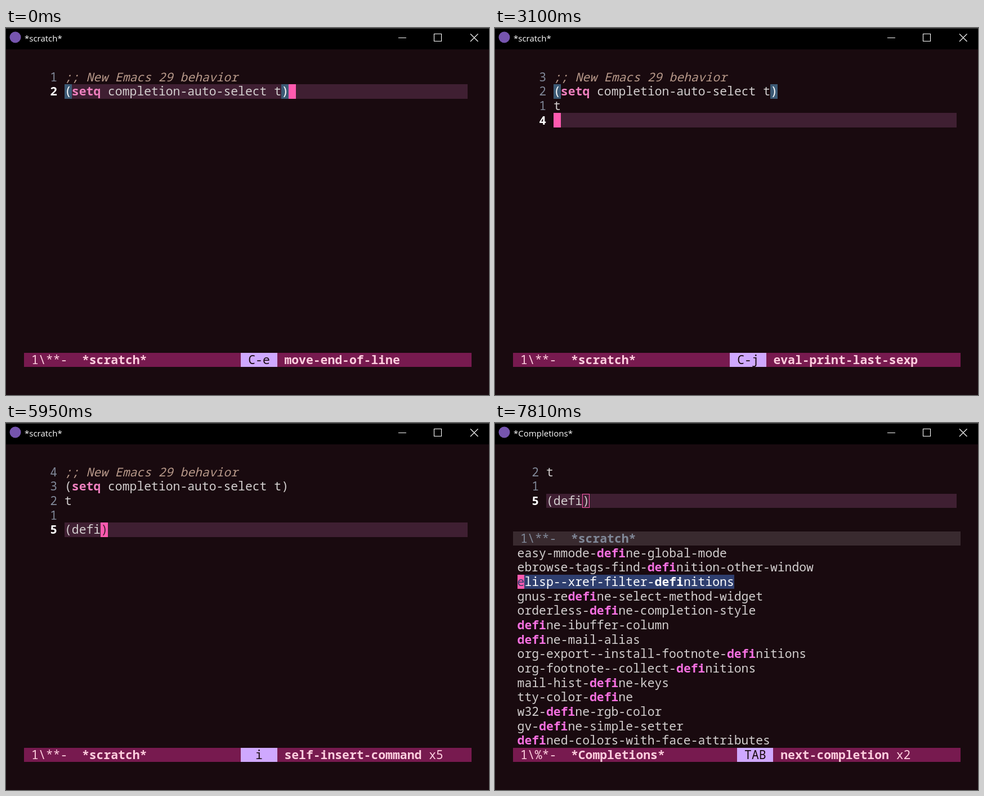
An HTML page with a canvas for the animation above (8 s loop, 858x653 px).

```html
<!DOCTYPE html>
<html lang="en">
<head>
<meta charset="utf-8">
<title>Completion auto-select</title>
<style>
html, body { margin: 0; width: 100%; height: 100%; overflow: hidden; background: #190a0f; }
canvas { display: block; }
</style>
</head>
<body>
<canvas id="stage" width="858" height="653"></canvas>
<script>
const ctx = document.getElementById('stage').getContext('2d');

const LOOP = 8000;
const SIZE = 21.4, CELL = 12.84, ROW = 25.67, BASE = 20.3;
const TOP = 74.4, LIST_TOP = 218.4, MODE_TOP = 577.8;
const LEFT = 32.2, RIGHT = 827, LIST_LEFT = 39.6, HL_RIGHT = 819.5;

const C = {
  bg: '#190a0f', fg: '#d3cfcf', dim: '#808898', white: '#ffffff',
  comment: '#b8998a', keyword: '#ef80bf', match: '#f570e0',
  line: '#3f1f32', cursor: '#ff5aaf', paren: '#3c5a75',
  mode: '#771a4f', modeText: '#ffcfdf', idle: '#392a2f',
  key: '#cfa8ff', select: '#2f3f6f'
};

const CANDIDATES = [
  'easy-mmode-define-global-mode',
  'ebrowse-tags-find-definition-other-window',
  'elisp--xref-filter-definitions',
  'gnus-redefine-select-method-widget',
  'orderless-define-completion-style',
  'define-ibuffer-column',
  'define-mail-alias',
  'org-export--install-footnote-definitions',
  'org-footnote--collect-definitions',
  'mail-hist-define-keys',
  'tty-color-define',
  'w32-define-rgb-color',
  'gv-define-simple-setter',
  'defined-colors-with-face-attributes'
];

const typed = (time, text, count) => ({
  time, lines: 5, text, key: text.slice(-1), command: 'self-insert-command', count
});

// Each key press and the editor state it leads to
const STEPS = [
  { time: 0, lines: 2, key: 'C-e', command: 'move-end-of-line' },
  { time: 3100, lines: 4, key: 'C-j', command: 'eval-print-last-sexp' },
  { time: 4880, lines: 5, text: '', key: 'RET', command: 'newline' },
  typed(5280, '('),
  typed(5560, '(d', 2),
  typed(5680, '(de', 3),
  typed(5800, '(def', 4),
  typed(5950, '(defi', 5),
  { time: 6220, pick: 0, key: 'TAB', command: 'completion-at-point' },
  { time: 7530, pick: 1, key: 'TAB', command: 'next-completion' },
  { time: 7810, pick: 2, key: 'TAB', command: 'next-completion', count: 2 }
];

const HIDDEN = [[280, 840], [1290, 1810], [2370, 2810], [3540, 4070], [4630, 4880], [6720, 7250]];
const PARENS_END = 3250;

function box(x, y, w, h, color) {
  // Snap to whole pixels so edges stay crisp
  const x0 = Math.round(x), y0 = Math.round(y);
  ctx.fillStyle = color;
  ctx.fillRect(x0, y0, Math.round(x + w) - x0, Math.round(y + h) - y0);
}

function write(text, x, top, color, style = '') {
  ctx.font = `${style} ${SIZE}px "Noto Sans Mono", "DejaVu Sans Mono", monospace`;
  ctx.fillStyle = color;
  ctx.fillText(text, x, top + BASE);
}

function titleBar(title) {
  box(0, 0, 858, 38, '#000000');
  box(0, 0, 858, 1, '#4a4a4a');
  ctx.fillStyle = '#7655ae';
  ctx.beginPath();
  ctx.arc(16.5, 16.5, 10, 0, Math.PI * 2);
  ctx.fill();
  ctx.font = '15px "Open Sans", "Noto Sans", sans-serif';
  ctx.fillStyle = '#ffffff';
  ctx.fillText(title, 33, 23.5);

  ctx.strokeStyle = '#ffffff';
  ctx.lineWidth = 1.1;
  ctx.beginPath();
  ctx.moveTo(697, 17.5);
  ctx.lineTo(711, 17.5);
  ctx.rect(760.5, 10.5, 13, 13);
  ctx.moveTo(825, 10.5);
  ctx.lineTo(838.5, 24);
  ctx.moveTo(838.5, 10.5);
  ctx.lineTo(825, 24);
  ctx.stroke();
}

function modeLine(top, flags, name, active) {
  const color = active ? C.modeText : C.dim;
  box(LEFT, top, RIGHT - LEFT, ROW, active ? C.mode : C.idle);
  write(flags, LEFT + CELL, top, color);
  write(name, LEFT + 8 * CELL, top, color, 'bold');
}

function keyHint(col, { key, command, count }) {
  const x = LEFT + col * CELL;
  const textX = x + 6 * CELL;
  box(x, MODE_TOP, 5 * CELL, ROW, C.key);
  write(key, x + (5 - key.length) / 2 * CELL, MODE_TOP, '#190a0f');
  write(command, textX, MODE_TOP, C.modeText, 'bold');
  if (count) write('x' + count, textX + (command.length + 1) * CELL, MODE_TOP, C.modeText);
}

function lineNumber(n, x, top, current) {
  if (current) box(x, top, HL_RIGHT - x, ROW, C.line);
  write(String(n), x - 2 * CELL, top, current ? C.white : C.dim, current ? 'bold' : '');
}

function cursor(x, top, char, ink) {
  box(x, top, CELL, ROW, C.cursor);
  if (char) write(char, x, top, ink);
}

function editor(step, shown, parens) {
  const x = LIST_LEFT + 5 * CELL + 0.2;
  const rowTop = i => TOP + i * ROW;
  const last = step.lines - 1;
  for (let i = 0; i <= last; i++) {
    lineNumber(i === last ? step.lines : last - i, x, rowTop(i), i === last);
  }

  write(';; New Emacs 29 behavior', x, rowTop(0), C.comment, 'italic');
  const code = rowTop(1);
  const parenInk = parens ? C.white : C.fg;
  for (const [char, col] of [['(', 0], [')', 30]]) {
    if (parens) box(x + col * CELL, code, CELL, ROW, C.paren);
    write(char, x + col * CELL, code, parenInk);
  }
  write('setq', x + CELL, code, C.keyword, 'bold');
  write('completion-auto-select t', x + 6 * CELL, code, C.fg);
  if (last > 1) write('t', x, rowTop(2), C.fg);

  const text = step.text || '';
  const closer = text ? ')' : '';
  const col = step.lines === 2 ? 31 : text.length;
  write(text + closer, x, rowTop(last), C.fg);
  if (shown) cursor(x + col * CELL, rowTop(last), closer, C.line);

  modeLine(MODE_TOP, '1\\**-', '*scratch*', true);
  keyHint(30, step);
}

function candidate(text, i, selected, shown) {
  const top = LIST_TOP + i * ROW;
  const at = text.indexOf('defi');
  const ink = selected ? C.white : C.fg;
  if (selected) box(LIST_LEFT, top, text.length * CELL, ROW, C.select);
  write(text.slice(0, at), LIST_LEFT, top, ink);
  write('defi', LIST_LEFT + at * CELL, top, selected ? C.white : C.match, 'bold');
  write(text.slice(at + 4), LIST_LEFT + (at + 4) * CELL, top, ink);
  if (selected && shown) cursor(LIST_LEFT, top, text[0], C.select);
}

function completions(step, shown) {
  const x = LIST_LEFT + 4 * CELL;
  [2, 1, 5].forEach((n, i) => lineNumber(n, x, TOP + i * ROW, i === 2));
  write('t', x, TOP, C.fg);
  write('(defi)', x, TOP + 2 * ROW, C.fg);
  ctx.strokeStyle = C.cursor;
  ctx.lineWidth = 1;
  ctx.strokeRect(155.5, 126.5, 12, 24);

  modeLine(LIST_TOP - ROW, '1\\**-', '*scratch*', false);
  CANDIDATES.forEach((text, i) => candidate(text, i, i === step.pick, shown));
  modeLine(MODE_TOP, '1\\%*-', '*Completions*', true);
  keyHint(31, step);
}

function draw(t) {
  const step = STEPS.findLast(s => s.time <= t);
  const shown = !HIDDEN.some(([from, to]) => t >= from && t < to);
  const listing = step.pick !== undefined;
  box(0, 0, 858, 653, C.bg);
  titleBar(listing ? '*Completions*' : '*scratch*');
  if (listing) completions(step, shown);
  else editor(step, shown, t < PARENS_END);
}

const start = performance.now();
function tick() {
  draw((performance.now() - start) % LOOP);
  requestAnimationFrame(tick);
}
tick();
</script>
</body>
</html>
```
